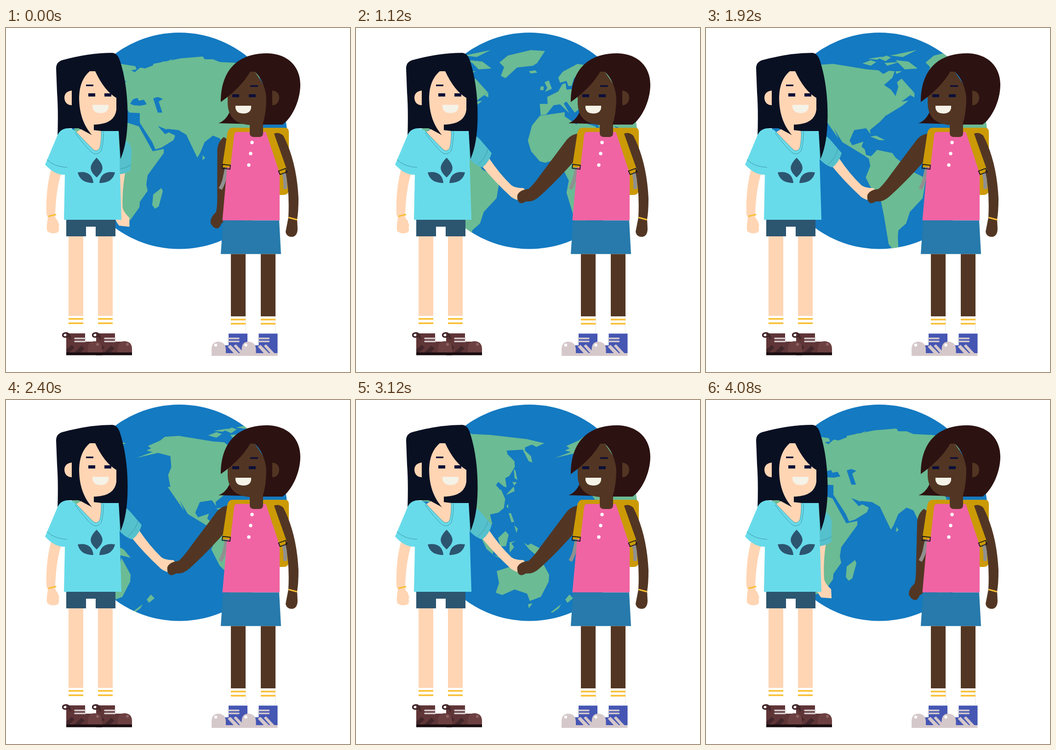
Recreate the animation shown at these times as an HTML page. Size 748 by 748 pixels, loop 4.16 s.

```html
<!DOCTYPE html>
<html lang="en">
<head>
<meta charset="utf-8">
<title>Friends around the world</title>
<style>
html, body { margin: 0; width: 100%; height: 100%; overflow: hidden; background: #fff; }
svg { display: block; width: 100vw; height: 100vh; }
.sea { fill: #147ac1; }
.skin { fill: #ffd5b4; }
.brown { fill: #523623; }
.hair { fill: #091022; }
.bob { fill: #2d1212; }
.shirt { fill: #68dbea; }
.denim { fill: #2c5570; }
.gold { fill: #cc9a06; }
.navy { fill: #0d0f38; }
.smile { fill: #f5f2e7; }
.seam { fill: none; stroke: #3b97a6; }
.band { fill: none; stroke: #f9be31; stroke-width: 3.3; }
.tail { fill: none; stroke: #909090; stroke-width: 8; }
.buckle { fill: none; stroke: #15141f; stroke-width: 1.8; }
.lace { fill: none; stroke: #d3c9cb; stroke-width: 3.6; stroke-linecap: round; }
</style>
</head>
<body>
<svg viewBox="0 0 748 748">
  <defs>
    <clipPath id="disc"><circle cx="377" cy="245.3" r="235.3"/></clipPath>

    <g id="land" fill="#6bbb94">
      <g id="europe">
        <path d="M168 165H185L184 150 208 138 217 122 224 120 226 134 245 132 250 122 262 116 252 113 256 94 242 110 237 126H230L226 115 212 119 208 108 218 95 250 78 281 83 284 90 272 92 280 96 292 86 302 88 345 72V185H292L268 184 260 171 244 184 226 160 220 164 232 185 212 166 198 168 182 188 170 190Z"/>
        <path d="M291 180H350V221L330 213 346 231 354 227 368 234 364 244 338 260 325 264 318 248 291 206Z"/>
      </g>
      <g id="asia">
        <path d="M320 78 380 66 428 62 432 68H450L465 74 505 76 584 85 622 94 605 102 595 97 580 103V110L593 122 596 136 588 133 575 108 540 110 542 118 557 133 558 145 546 165 537 170 540 190 534 188 522 178 517 185 530 200H320Z"/>
        <path d="M320 195H528L537 215 534 235 522 245 504 249 509 270 495 275 506 300 504 310 486 285 465 240 450 234 432 248 422 272 416 282 403 255 392 232 375 222 347 219 330 212Z"/>
        <path d="M428 276 433 283 427 287ZM340 80 362 66 346 82Z"/>
      </g>
      <g id="africa">
        <path d="M168 191 222 183V192L248 210 252 202 289 214 300 234 319 268 343 263V272L308 320 305 340 308 354 291 378 290 390 270 418 246 424 226 358 231 332 219 308 221 294 205 285 180 293 168 290 149 268 142 245 151 212Z"/>
        <path d="M338 348 341 355 332 388 324 393 318 385 320 362Z"/>
      </g>
      <g id="america" transform="translate(-397)">
        <path d="M184 126 219 113 206 110 216 105 209 100 236 88 246 80 276 78 350 90 375 92 385 100 398 93 410 94 405 108 387 124 402 134 412 148 418 128 415 118 425 110 452 140 425 160 440 158 425 170 392 190H258L253 163 260 146 258 122 231 115Z"/>
        <path d="M392 189 378 204 356 222 358 231 348 218 322 222 312 245 318 255 342 247 338 258 345 264 348 276 364 280 362 290 342 276 296 248 278 218 288 241 252 189Z"/>
        <path d="M354 284 372 265 405 272 412 282 435 300 440 308 478 327 471 370 443 400 435 425 418 440 417 455 418 477 405 480 397 470 387 410 380 375 365 360 347 325 357 300Z"/>
        <path d="M357 236 370 234 389 244 377 244Z"/>
        <path d="M340 77 358 70 370 74 358 82ZM352 67 384 62 372 69ZM376 66 392 60 402 64 390 72Z"/>
        <path d="M400 60 458 48 428 63ZM388 76 420 74 394 82ZM412 70 440 73 460 88 432 90Z"/>
        <path d="M412 94H426L414 100ZM444 146 453 140V151Z"/>
      </g>
      <g id="atlantic" transform="translate(-231.7)">
        <path d="M312 75 330 60 380 48 411 50 394 76 385 82 350 86 335 100 325 109 315 104 322 85Z"/>
        <path d="M376 94 390 92 394 97 380 99ZM410 118 419 114 426 132 411 139 416 130ZM402 127H408V135H400Z"/>
      </g>
      <g id="oceania" transform="translate(212.5)">
        <path transform="translate(-425)" d="" />
      </g>
      <g id="pacific" transform="translate(212.5)">
        <path d="M306 372 311 398 304 419 318 424 345 412 372 421 378 437 402 428 419 395 420 380 400 343 396 360 378 356 380 350 350 358Z"/>
        <path d="M374 444 384 442 376 453ZM455 434 464 423 472 431 460 441ZM423 462 446 444 441 453 428 462Z"/>
        <path d="M365 310 374 316 380 312 405 325 420 343 390 336 376 324Z"/>
        <path d="M309 300 325 285 332 293 326 318 314 318ZM270 295 298 326V336L284 324ZM298 337 318 342V346Z"/>
        <path d="M334 310 347 306 338 312 344 320 334 332ZM332 246H337L344 265 338 266ZM344 272 352 280 349 289Z"/>
        <path d="M343 150 347 154 351 174 345 170ZM340 178 350 179 344 186ZM343 188 345 198 326 207ZM327 231 331 226V236Z"/>
      </g>
      <g class="sea">
        <path d="M270 165 276 155 286 152 289 158 300 156 306 166 292 169 278 168Z"/>
        <path d="M320 153 330 150 341 154 332 160 340 184 330 184Z"/>
      </g>
    </g>

    <g id="boot">
      <path fill="#5f3537" d="M131 664H172V682H195V707H131Z"/>
      <path fill="#42262a" d="M131 699 143 689 149 695 137 706H131ZM148 706 164 691 171 697 161 706Z"/>
      <path fill="#6c4041" d="M178 706V697Q179 681 193 681 209 682 209 698V706Z"/>
      <circle cx="199" cy="688" r="3" fill="#8d6263"/>
      <path fill="#180c10" d="M131 705.5H209V711.5H131Z"/>
      <path class="lace" d="M150 675H172M150 681.5H172"/>
      <path fill="none" stroke="#42262a" stroke-width="3.5" d="M140 677Q139 663 130 663 122 664 124 670 128 675 139 668"/>
    </g>
    <g id="sneaker">
      <path fill="#4556b3" d="M484 664.5H525V707H475V690H484Z"/>
      <path fill="#d5c8cb" d="M447 713V697Q448 682 462 682 477 683 478 698V707H525V713ZM482 693 488 689 506 707H495ZM495 691 500 688 518 707H509Z"/>
      <circle cx="456" cy="689.5" r="3.2" fill="#fff"/>
      <path class="lace" d="M484 675H506M484 681.5H506"/>
    </g>
  </defs>

  <circle class="sea" cx="377" cy="245.3" r="235.3"/>
  <g clip-path="url(#disc)"><g id="map">
    <use href="#land" x="-858"/><use href="#land"/>
  </g></g>

  <g id="armA">
    <path class="skin" d="M290 284Q312 317 338 342 346 348 364 348L378 362 360 376Q346 374 337 367 300 333 272 298Z"/>
    <path fill="#55c1cd" d="M240 232Q258 228 272 245L295 272Q290 291 275 303 260 300 245 283Z"/>
    <path class="seam" d="M287 263Q282 283 264 298"/>
  </g>
  <path id="armB" class="brown" d="M486 229Q470 230 459 242L402 318Q385 342 375 350 356 352 351 363 349 379 359 381 366 380 369 377 385 379 398 367 432 337 474 290 500 260 486 229Z"/>

  <!-- friend with long hair -->
  <path class="hair" d="M109 88Q109 74 122 70 180 54 231 54 243 55 248 72C262 115 266 165 264 210Q262 255 249 285L245 224H191L186 233 158 218H136L112 237Q114 180 111 140Z"/>
  <path class="skin" d="M99 304Q86 350 88 405L91 413Q87 435 90 442 101 450 113 444 117 438 114 432L116 430 112 418Q106 414 107 404 109 350 120 316Z"/>
  <path class="band" d="M92 409.5 109 405.5"/>
  <path class="skin" d="M153 226 163 220 187 233 191 222 208 224Q208 256 203 264 197 272 188 265Z"/>
  <path class="shirt" d="M110 238Q116 219 134 218 147 219 152 226L188 263Q197 272 204 261 208 245 207 224H245L251 417H126L128 319Q106 320 85 297Z"/>
  <path class="seam" d="M89 286Q105 302 133 303M150 228Q171 256 186 270 197 279 207 267 212 250 212 225M152 226 188 263Q197 272 204 261 208 245 207 224"/>
  <g class="denim">
    <path d="M197 282C180 300 180 309 197 325 214 309 214 300 197 282Z"/>
    <path id="leaf" d="M156 314C160 331 173 337 190 337 188 318 176 311 156 314Z"/>
    <use href="#leaf" transform="matrix(-1 0 0 1 393 0)"/>
    <path d="M131 417H238V453H195V432H174V453H131Z"/>
  </g>
  <path class="skin" d="M182 94H194Q214 137 240 152V178Q236 208 195 210H191V232L187 233C171 214 159 190 159 150Q160 113 182 94ZM143 136Q127 138 127 152 128 167 143 168ZM136 453H168V626H136ZM200 453H232V626H200Z"/>
  <path class="navy" d="M179 142H194V149H179ZM214 142H229V149H214ZM174 123H190V126.5H174Z"/>
  <path class="smile" d="M188 167H223V172Q221 185 206 185 190 185 188 172Z"/>
  <path class="band" d="M136 632.5H168M136 642H168M200 632.5H232M200 642H232"/>
  <use href="#boot" x="65"/><use href="#boot"/>

  <!-- friend with backpack -->
  <path class="gold" d="M560 217H607Q615 217 615 226V352Q614 363 603 363H580Z"/>
  <path class="brown" d="M582 230Q593 225 603 234 632 290 636 370 636 400 633 416L634 436Q634 451 624 454 610 455 608 443L614 412Q617 355 607 310Z"/>
  <path class="band" d="M614.5 412 633 417"/>
  <path class="tail" d="M480 304 476 323Q474 336 466 350M604 316Q608 330 607 350"/>
  <path fill="#f064a4" d="M497 225H566L595 312V418.5H470.500L482 290Z"/>
  <path class="gold" d="M481 230Q483 217 493 217H575L583 230 611 309 595 316 565 226H502Q497 226 496 233L488 303H470Z"/>
  <path class="buckle" d="M471 296.5 488 298.5 487 307 470 305ZM592.5 311 608 305.5 611 313 596 318.5Z"/>
  <path fill="#277aab" d="M472 418.5H594L598 491.5H467Z"/>
  <path class="brown" d="M489 491.5H521V627H489ZM554 491.5H586V627H554ZM530 200H559V230Q558 237 551 237H539Q531 237 530 230Z"/>
  <path class="bob" d="M462 207Q477 202 486 183L535 209Z"/>
  <path class="brown" d="M482 145 531 95H541L575 145 559 211H530Q484 208 482 165Z"/>
  <path class="bob" d="M467 161C467 100 496 55 568 55 615 56 640 86 640 123 640 160 620 198 601 210H558Q566 185 566 150 561 113 541 95H531Q510 131 467 161Z"/>
  <path class="brown" d="M579 136Q594 138 594 152 593 167 579 168Z"/>
  <path class="navy" d="M492 144H507V150.5H492ZM528 144H543V150.5H528ZM531 124.5H548V128H531Z"/>
  <path class="smile" d="M499 169H533V174Q531 186 516 186 501 186 499 174Z"/>
  <g fill="#fff"><circle cx="535" cy="249" r="3.7"/><circle cx="532" cy="273" r="3.7"/><circle cx="528" cy="298" r="3.7"/></g>
  <path fill="#fff" d="M489 627H521.5V665H489ZM554 627H585.5V665H554Z"/>
  <path stroke="#ddd" stroke-width=".8" d="M521.5 627V665M585.5 627V665"/>
  <path class="band" d="M489 634H521M489 643H521M554 634H586M554 643H586"/>
  <use href="#sneaker"/><use href="#sneaker" x="65.5"/>
</svg>
<script>
const LOOP = 4160, STEP = 80, DRIFT = 16.55;
const $ = id => document.getElementById(id);
const turn = (id, angle, x, y) => $(id).setAttribute("transform", `rotate(${angle} ${x} ${y})`);

const ease = x => {
  x = Math.min(1, Math.max(0, x));
  return x * x * (3 - 2 * x);
};

function draw(now) {
  const tick = Math.floor((now % LOOP) / STEP);
  const lowered = 1 - ease(tick / 13.5) + ease((tick - 43) / 9);
  $("map").setAttribute("transform", `translate(${tick * DRIFT})`);
  turn("armA", 43.8 * lowered, 236, 261);
  turn("armB", -36.7 * lowered, 491.6, 252);
}

const start = performance.now();
function loop() {
  draw(performance.now() - start);
  requestAnimationFrame(loop);
}
loop();
</script>
</body>
</html>
```
